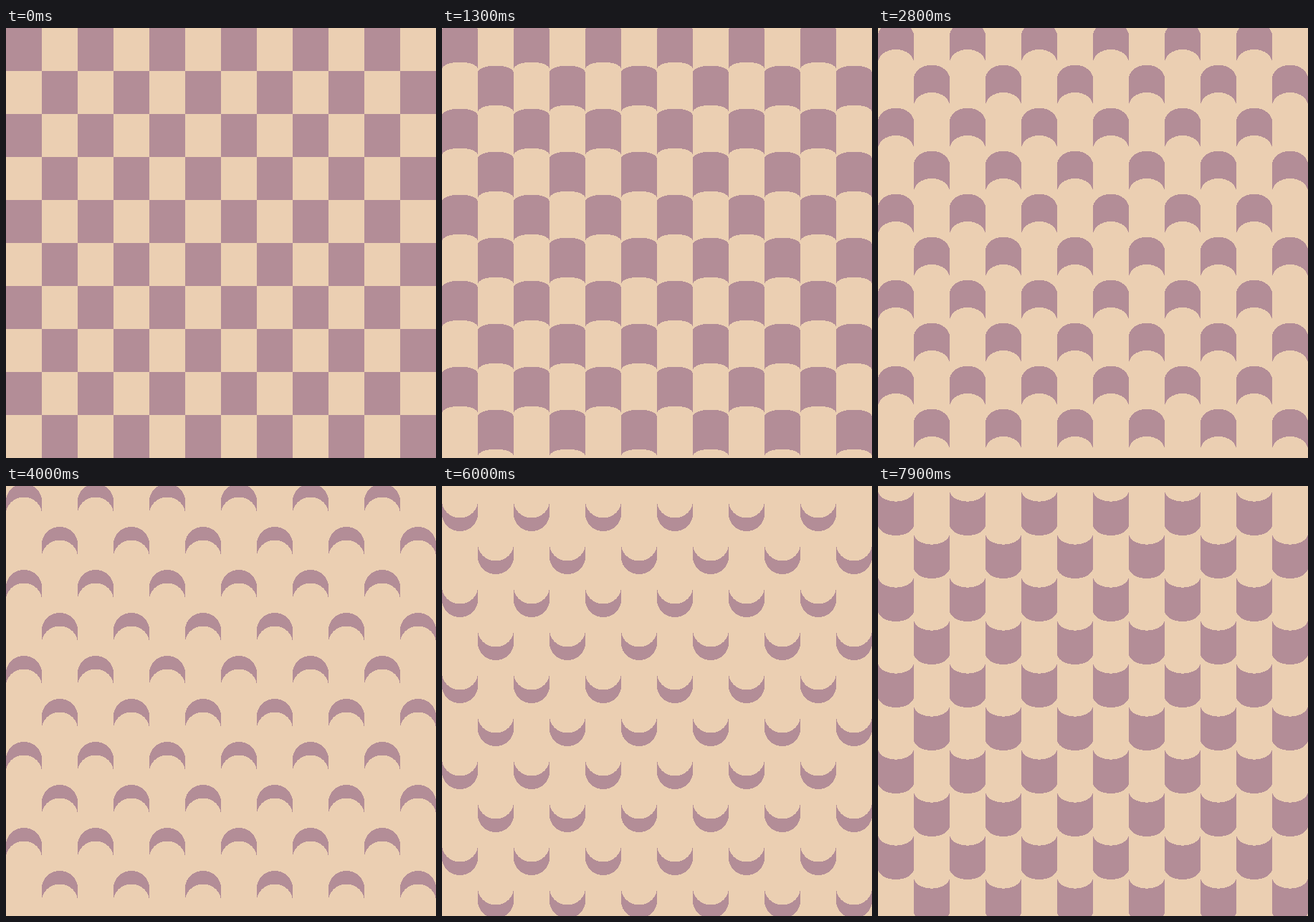
An HTML page for the animation above (8 s loop, 600 by 600 pixels).

```html
<!DOCTYPE html>
<html lang="en">
<head>
<meta charset="utf-8">
<title>Turning cylinders</title>
<style>
  html, body { margin: 0; width: 100%; height: 100%; overflow: hidden; background: #ebcfb2; }
  svg { display: block; width: 100%; height: 100%; }
  path { fill: #b38d97; shape-rendering: crispEdges; }
</style>
</head>
<body>
<svg viewBox="0 0 600 600"><path id="tubes"/></svg>
<script>
  const W = 50, H = 60, COLS = 12, ROWS = 10;
  const LOOP = 8000, STEP = 100, HALF_TURN = 10000;
  const tubes = document.getElementById('tubes');

  // Side of a tilted cylinder: the near cap has the background colour,
  // so only the band between the two cap edges shows.
  function side(x, cy, angle) {
    const half = H / 2 * Math.cos(angle);
    const ry = W / 2 * Math.sin(angle);
    const far = cy - half, near = cy + half;
    const up = half >= 0 ? 1 : 0;
    return `M${x} ${far}A${W / 2} ${ry} 0 0 ${up} ${x + W} ${far}` +
           `V${near}A${W / 2} ${ry} 0 0 ${1 - up} ${x} ${near}Z`;
  }

  function draw(time) {
    const t = Math.floor(time % LOOP / STEP) * STEP;
    const angle = Math.PI * t / HALF_TURN;
    let d = '';
    for (let row = 0; row < ROWS; row++)
      for (let col = row % 2; col < COLS; col += 2)
        d += side(col * W, (row + 0.5) * H, angle);
    tubes.setAttribute('d', d);
  }

  const start = performance.now();
  function tick() {
    draw(performance.now() - start);
    requestAnimationFrame(tick);
  }
  tick();
</script>
</body>
</html>
```
